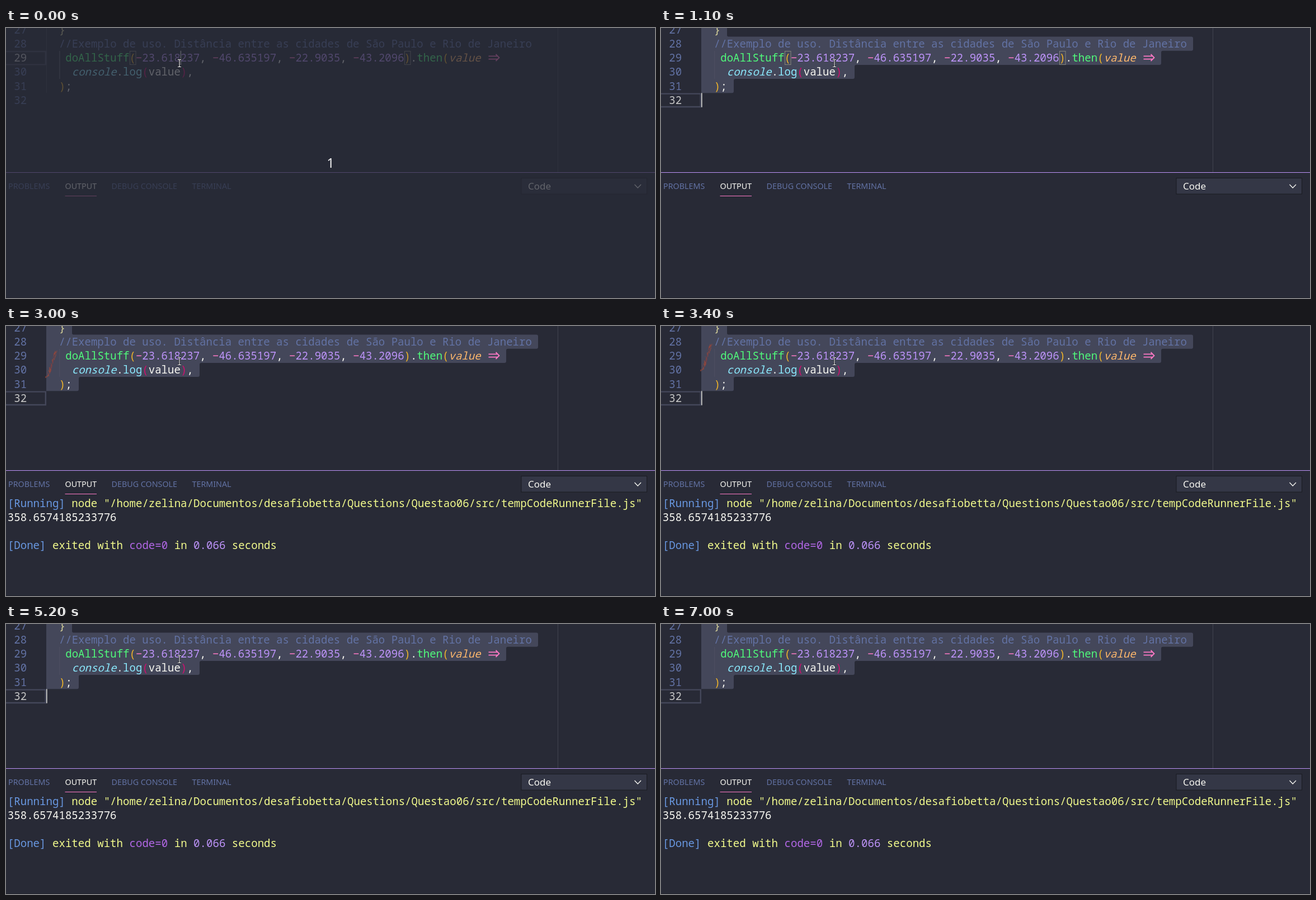
Animation of 1160x483 px, one loop 7.1 s. Source, as an HTML page:

```html
<!DOCTYPE html>
<html lang="pt">
<head>
<meta charset="utf-8">
<title>Editor</title>
<style>
  html, body { margin: 0; width: 100%; height: 100%; overflow: hidden; background: #282a36; }
  svg { display: block; width: 100%; height: 100%; }
  text { white-space: pre; }
  .mono { font: 19.05px "Noto Sans Mono", "DejaVu Sans Mono", monospace; }
  .log { font-size: 19.1px; }
  .ui { font: 14.3px "Noto Sans", "Open Sans", sans-serif; }
</style>
</head>
<body>
<svg id="stage" viewBox="0 0 1160 483"></svg>
<script>
const LOOP = 7100, CELL = 11.43, LEFT = 72, ROW = 25.2;
const C = {
  bg: '#282a36', line: '#44475a', comment: '#6272a4', white: '#f8f8f2', green: '#50fa7b',
  purple: '#bd93f9', pink: '#ff79c6', orange: '#ffb86c', cyan: '#8be9fd', gold: '#f0b429',
  magenta: '#d0106f', yellow: '#f1fa8c', blue: '#6897e0', violet: '#b267e6'
};
const stage = document.getElementById('stage');

function el(name, attrs, parent = stage) {
  const node = document.createElementNS('http://www.w3.org/2000/svg', name);
  for (const key in attrs) node.setAttribute(key, attrs[key]);
  parent.appendChild(node);
  return node;
}
const group = () => el('g', {});
const rect = (x, y, width, height, fill, parent, more) =>
  el('rect', { x, y, width, height, fill, ...more }, parent);
const stroke = (d, color, width, parent) =>
  el('path', { d, fill: 'none', stroke: color, 'stroke-width': width }, parent);
const show = (node, on) => node.setAttribute('visibility', on ? 'visible' : 'hidden');
const rowTop = n => 15.5 + (n - 28) * ROW;

// Each token is [text, colour, italic?].
function write(x, y, tokens, parent, cls = 'mono') {
  const text = el('text', { x, y, class: cls }, parent);
  for (const [str, fill, italic] of tokens) {
    const span = el('tspan', { fill }, text);
    if (italic) span.setAttribute('font-style', 'italic');
    span.textContent = str;
  }
  return text;
}
const code = (n, col, tokens) => write(LEFT + col * CELL, rowTop(n) + 19.4, tokens);

function selectionPath(ends, r = 3) {
  let d = `M${LEFT} 0H${ends[0]}`;
  ends.forEach((x, i) => {
    const y = rowTop(28 + i), last = i === ends.length - 1;
    const next = last ? LEFT : ends[i + 1], s = Math.sign(next - x);
    d += `V${y - r}Q${x} ${y} ${x + s * r} ${y}`;
    d += last ? `H${LEFT}` : `H${next - s * r}Q${next} ${y} ${next} ${y + r}`;
  });
  return d + 'Z';
}

// Editor background
rect(0, 0, 1160, 483, C.bg);
rect(986, 0, 1, 258, '#424450');
const guides = group();
rect(72, 0, 1, 116, '#424450', guides);
rect(95.3, 41, 1.2, 50, '#62646f', guides);
const selection = group();
el('path', { d: selectionPath([118, 951, 894, 346, 130]), fill: C.line }, selection);
rect(95.3, 41, 1, 50, '#4f5163', selection);
const activeRow = stroke('M0 1.3H70.8V24.7H0', C.line, 2.4);

// Code
const numbers = {};
for (let n = 27; n <= 32; n++)
  numbers[n] = write(14.3, rowTop(n) + 19.4, [[String(n), C.comment]]).firstChild;

const number = v => [['\u2212', C.pink], [v, C.purple]];
const comma = [', ', C.white];
code(27, 2, [['}', '#d8d49a']]);
code(28, 2, [['//Exemplo de uso. Distância entre as cidades de São Paulo e Rio de Janeiro', C.comment]]);
code(29, 3, [
  ['doAllStuff', C.green], ['(', C.gold],
  ...number('23.618237'), comma, ...number('46.635197'), comma,
  ...number('22.9035'), comma, ...number('43.2096'),
  [')', C.gold], ['.', C.white], ['then', C.green], ['(', C.gold], ['value', C.orange, true]
]);
stroke('M862.5 50.3H878.5M862.5 55.7H878.5M875.5 47L881.5 53L875.5 59', C.pink, 1.8);
code(30, 4, [
  ['console', C.cyan, true], ['.', C.white], ['log', C.cyan],
  ['(', C.magenta], ['value', C.white], [')', C.magenta], [',', C.white]
]);
code(31, 2, [[')', C.gold], [';', C.white]]);

const brackets = group();
for (const x of [221, 712])
  rect(x + 0.5, 41.5, 10.5, 24, 'none', brackets, { stroke: '#85867c' });

// Reddish streak beside the selected code
const streak = group();
let seed = 11;
const rnd = () => (seed = seed * 16807 % 2147483647) / 2147483647;
for (let i = 0; i < 44; i++) {
  const k = i / 43, x = 73 + 15 * Math.pow(k, 0.8) + (rnd() - 0.5) * 4, y = 81 - 44 * k;
  stroke(`M${x} ${y}l${(rnd() - 0.4) * 4} ${-2 - rnd() * 4}`, rnd() < 0.4 ? '#b04a32' : '#7d4345', 1.3, streak)
    .setAttribute('opacity', 0.45 + rnd() * 0.4);
}

const caret = rect(0, 0, 1.6, 25.4, '#d4d4d0');

// Panel
rect(0, 258, 1160, 1, C.purple);
rect(0, 482, 1160, 1, '#21222c');
[['PROBLEMS', 4], ['OUTPUT', 105.5], ['DEBUG CONSOLE', 188.5], ['TERMINAL', 332.5]].forEach(([label, x], i) =>
  write(x, 288, [[label, i === 1 ? C.white : C.comment]], stage, 'ui'));
rect(105.5, 300, 56.5, 1, C.pink);
rect(921, 268.5, 224.5, 28.5, '#343746', stage, { stroke: '#191a21' });
write(933, 288.5, [['Code', C.white]], stage, 'ui').style.fontSize = '17px';
stroke('M1123.5 280L1129.2 286L1135 280', C.white, 1.3);

// Output
const running = group(), done = group();
const log = (y, tokens, parent) => write(2.8, y, tokens, parent, 'mono log');
log(323.6, [
  ['[Running]', C.blue],
  [' node "/home/zelina/Documentos/desafiobetta/Questions/Questao06/src/tempCodeRunnerFile.js"', C.yellow]
], running);
log(348.8, [['358.6574185233776', C.white]], done);
log(399.4, [
  ['[Done]', C.blue], [' exited with ', C.yellow], ['code=0', C.violet],
  [' in ', C.yellow], ['0.066', C.purple], [' seconds', C.yellow]
], done);

// Countdown veil
const veil = group();
rect(0, 0, 1160, 483, C.bg, veil, { opacity: 0.72 });
const count = write(580, 250, [['1', '#f4f4f4']], veil, 'ui');
count.setAttribute('text-anchor', 'middle');
count.style.fontSize = '23px';
count.style.fontWeight = 500;

// Mouse pointer
const mouse = group();
const beam = 'M-3 -6.5H-1Q0 -6.5 0 -5.5V5.5Q0 6.5 -1 6.5H-3M3 -6.5H1Q0 -6.5 0 -5.5M0 5.5Q0 6.5 1 6.5H3';
stroke(beam, '#15161c', 2.6, mouse);
stroke(beam, '#ffffff', 1.1, mouse);

const bezier = (a, b, c, k) => (1 - k) * (1 - k) * a + 2 * k * (1 - k) * b + k * k * c;
const blinks = [1100, 1700, 2200, 2600, 3100, 3700, 4100, 4700, 5200, 5700, 6200, 6700];

function draw(t) {
  const selected = t >= 1100, row = selected ? 32 : 29;
  show(veil, t < 100);
  show(selection, selected);
  show(guides, !selected);
  show(brackets, t < 1400);
  activeRow.setAttribute('transform', `translate(0 ${rowTop(row)})`);
  for (const n of [29, 32]) numbers[n].setAttribute('fill', n === row ? '#c6c6c6' : C.comment);

  const caretOn = selected ? blinks.filter(b => t >= b).length % 2 === 1 : t < 100 || t >= 900;
  show(caret, caretOn);
  caret.setAttribute('x', selected ? 72 : 311.6);
  caret.setAttribute('y', rowTop(row));

  show(running, t >= 2800);
  show(done, t >= 2900);
  const tick = Math.floor(t / 100);
  show(streak, tick >= 30 && tick < 35);
  streak.setAttribute('transform', `translate(0 ${(34 - tick) * 3})`);

  const k = Math.min(1, Math.max(0, (tick - 52) / 5));
  show(mouse, k < 1);
  mouse.setAttribute('transform',
    `translate(${bezier(310, 240, 24, k * k)} ${bezier(63, 300, 40, k * k)})`);
}

const start = performance.now();
function frame() {
  draw((performance.now() - start) % LOOP);
  requestAnimationFrame(frame);
}
draw(0);
requestAnimationFrame(frame);
</script>
</body>
</html>
```
